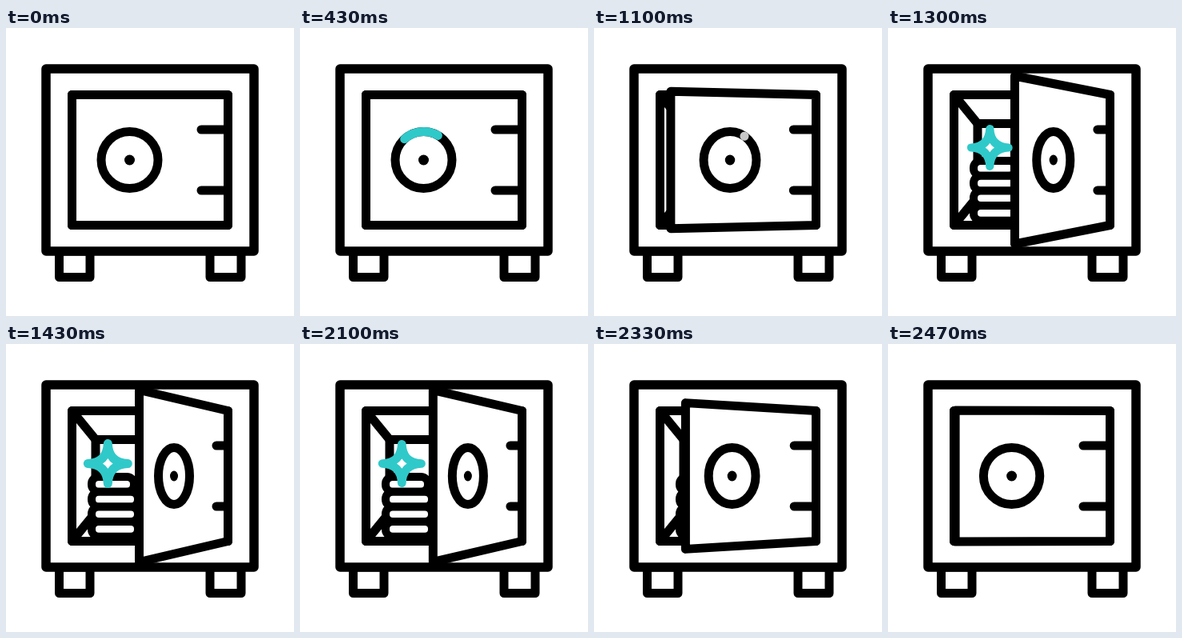
Animation of 360 by 360 pixels, one loop 2500 ms. Source, as an HTML page with a canvas:

```html
<!DOCTYPE html>
<html>
<head>
<meta charset="utf-8">
<style>
html, body { margin: 0; width: 100%; height: 100%; overflow: hidden; background: #fff; }
canvas { display: block; width: 360px; height: 360px; }
</style>
</head>
<body>
<canvas id="stage" width="360" height="360"></canvas>
<script>
const ctx = document.getElementById('stage').getContext('2d');
const LOOP = 2500, CY = 165, TEAL = '#30c9c9', GREY = '#c8c8c8';

const ease = (t, from, to) => {
  const k = Math.min(1, Math.max(0, (t - from) / (to - from)));
  return k * k * (3 - 2 * k);
};
const mix = (a, b, k) => a + (b - a) * k;

function shape(draw, { fill, color = '#000', width = 11 } = {}) {
  ctx.beginPath();
  draw();
  if (fill) { ctx.fillStyle = fill; ctx.fill(); }
  ctx.strokeStyle = color;
  ctx.lineWidth = width;
  ctx.stroke();
}

function poly(points, closed, style) {
  shape(() => {
    points.forEach(([x, y]) => ctx.lineTo(x, y));
    if (closed) ctx.closePath();
  }, style);
}

const box = (x1, y1, x2, y2, style) =>
  poly([[x1, y1], [x2, y1], [x2, y2], [x1, y2]], true, style);

function drawBody() {
  box(66.5, 279, 105, 311.5);
  box(255, 279, 294, 311.5);
  box(50, 51, 310, 279, { fill: '#fff', width: 11.5 });
}

function drawInside() {
  poly([[82.5, 83.5], [112, 119.5], [200, 119.5]]);
  poly([[112, 119.5], [112, 210.5], [82.5, 246.5]]);
  for (let i = 0; i < 4; i++) {
    shape(() => ctx.roundRect(107, 166 + i * 18.7, i ? 58 : 53, 18.7, 9), { fill: '#fff', width: 10 });
  }
  box(82.5, 83.5, 277.5, 246.5);
}

function drawDoor(t) {
  const swing = ease(t, 1010, 1370) - ease(t, 2090, 2505);
  const slide = ease(t, 963, 1359) - ease(t, 2090, 2480);

  const left = mix(82.5, 166.5, swing), half = mix(81.5, 107.5, swing);
  poly([[left, CY - half], [277.5, 83.5], [277.5, 246.5], [left, CY + half]], true, { fill: '#fff' });

  const hinge = mix(244, 263, slide);
  for (const y of [127, 203]) poly([[hinge, y], [277.5, y]]);

  const cx = mix(154.5, 210, slide), rx = mix(35.5, 19.5, swing);
  shape(() => ctx.ellipse(cx, CY, rx, 35.5, 0, 0, 2 * Math.PI));
  ctx.beginPath();
  ctx.ellipse(cx, CY, mix(6.5, 5, swing), 6.5, 0, 0, 2 * Math.PI);
  ctx.fillStyle = '#000';
  ctx.fill();

  // The highlight makes one anticlockwise turn, its tail trailing its head.
  if (t > 230 && t < 1110) {
    const angle = k => (303 - 360 * k) * Math.PI / 180;
    const head = ease(t, 225, 925), tail = ease(t, 395, 1110);
    const color = head - tail < 0.03 ? GREY : TEAL;
    shape(() => ctx.ellipse(cx, CY, rx, 35.5, 0, angle(tail), angle(head) - 0.001, true), { color });
  }
}

function drawStar(t) {
  const size = ease(t, 1150, 1330) - ease(t, 2080, 2280);
  if (size < 0.01) return;
  ctx.save();
  ctx.translate(127.3, 149.5);
  ctx.scale(size, size);
  shape(() => {
    ctx.moveTo(0, -25);
    ctx.quadraticCurveTo(1, -1, 25, 0);
    ctx.quadraticCurveTo(1, 1, 0, 25);
    ctx.quadraticCurveTo(-1, 1, -25, 0);
    ctx.quadraticCurveTo(-1, -1, 0, -25);
    ctx.closePath();
  }, { fill: '#fff', color: TEAL });
  ctx.restore();
}

function frame() {
  const t = performance.now() % LOOP;
  ctx.fillStyle = '#fff';
  ctx.fillRect(0, 0, 360, 360);
  ctx.lineCap = ctx.lineJoin = 'round';
  drawBody();
  drawInside();
  drawDoor(t);
  drawStar(t);
  requestAnimationFrame(frame);
}
frame();
</script>
</body>
</html>
```
